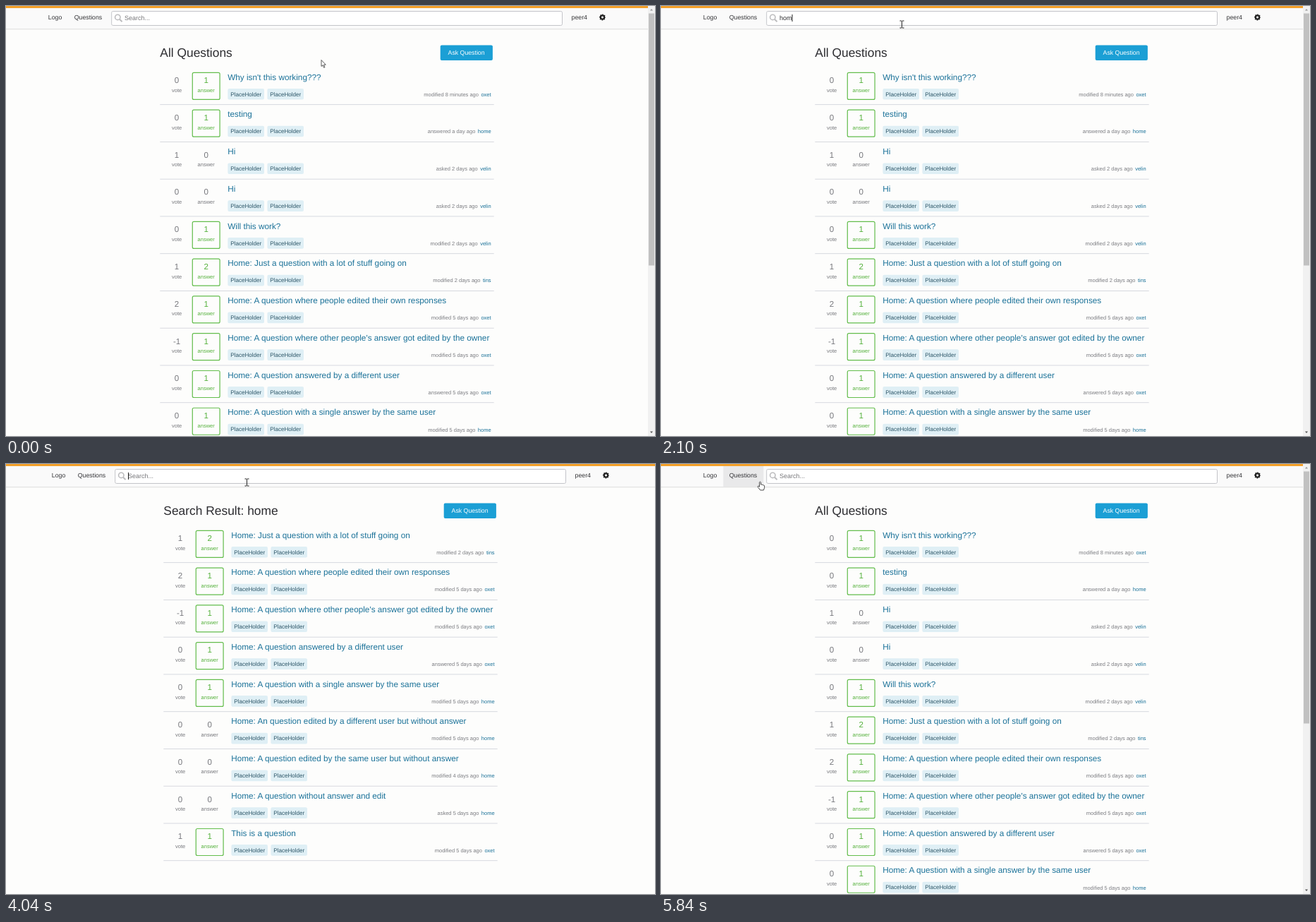
An HTML page for the animation above (5.87 s loop, 920x609 px).

```html
<!DOCTYPE html>
<html lang="en">
<head>
<meta charset="utf-8">
<title>Question list search</title>
<style>
  html, body { margin: 0; width: 100%; height: 100%; overflow: hidden; background: #fdfdfc; }
  svg { display: block; width: 920px; height: 609px; font-family: "Liberation Sans", Arial, sans-serif; text-rendering: geometricPrecision; }
  .nav { font-size: 8.75px; fill: #333336; }
  .heading { font-size: 17.4px; fill: #2d2d31; }
  .title { font-size: 11.77px; fill: #1b7299; }
  .num { font-size: 11.6px; text-anchor: middle; }
  .label { font-size: 7.5px; text-anchor: middle; }
  .grey { fill: #77787d; }
  .green { fill: #55b13c; }
  .tag { font-size: 8.1px; fill: #2d5668; }
  .meta { font-size: 7.5px; fill: #7c7d82; text-anchor: end; }
  .meta tspan { fill: #1b7299; }
  .field { font-size: 9px; fill: #77777a; }
</style>
</head>
<body>
<svg viewBox="0 0 920 609">
  <rect width="920" height="609" fill="#fdfdfc"/>
  <rect y="32" width="920" height="1" fill="#e4e4e4"/>
  <rect y="33" width="920" height="1" fill="#f4f4f3"/>
  <rect y="3" width="920" height="29" fill="#fafafa"/>
  <rect width="920" height="3" fill="#f3a029"/>

  <g id="page">
    <rect id="hover" x="88.3" y="3" width="57" height="29" fill="#e9e9ea"/>
    <text class="nav" x="59.8" y="19.3">Logo</text>
    <text class="nav" x="96.8" y="19.3">Questions</text>
    <rect x="149.7" y="7.5" width="638.8" height="20" rx="2" fill="#fff" stroke="#c3c4c9"/>
    <g fill="none" stroke="#bdbdbf" stroke-width="1.6">
      <circle cx="158.3" cy="15.9" r="3.7"/>
      <path d="M161 18.7L164.6 22.2" stroke-width="2"/>
    </g>
    <text id="field" class="field" x="168" y="20.3"></text>
    <rect id="caret" y="12" width="1" height="10" fill="#222"/>
    <text class="nav" x="801.6" y="19.3">peer4</text>
    <g fill="none" stroke="#222">
      <circle cx="845.5" cy="16" r="2.6" stroke-width="2.2"/>
      <circle cx="845.5" cy="16" r="3.8" stroke-width="1.5" stroke-dasharray="1.492" stroke-dashoffset=".746"/>
    </g>

    <text id="heading" class="heading" x="218.3" y="72.3"></text>
    <rect x="615.7" y="55.5" width="74.2" height="21.6" rx="2" fill="#1b9fd5"/>
    <text x="652.6" y="69.1" font-size="8.75" text-anchor="middle" fill="#fff">Ask Question</text>

    <g id="allList"></g>
    <g id="foundList"></g>
    <g id="loader" fill="none" stroke="#f3a029" stroke-width="5">
      <path d="M-16.6 -16.6A23.5 23.5 0 0 0 -16.6 16.6M16.6 -16.6A23.5 23.5 0 0 1 16.6 16.6"/>
    </g>
  </g>

  <g id="scrollbar">
    <rect x="910" width="10" height="609" fill="#f1f1f1"/>
    <rect x="911" y="10.5" width="8" height="357" fill="#c1c1c1"/>
    <path d="M913 6.5L915 4L917 6.5Z" fill="#9a9a9a"/>
    <path d="M913 602.5L915 605L917 602.5Z" fill="#555"/>
  </g>

  <g id="cursor">
    <path id="arrow" d="M0 0V9L2 7.2L3.6 10.8L5 10.2L3.5 6.7H6.3Z" fill="#fff" stroke="#333" stroke-width=".8"/>
    <path id="beam" d="M-3 -5H-.7L0 -4.4L.7 -5H3M0 -4.4V4.4M-3 5H-.7L0 4.4L.7 5H3" fill="none" stroke="#222"/>
    <path id="hand" d="M-1 .8Q0 -.6 1 .8V4.2Q2.2 3.5 2.9 4.5Q4.2 4 4.7 5.1Q6 4.8 6.1 6.2V8.6L5 12H.2L-3.4 7.4Q-3.4 5.8 -1.9 6.4L-1 7.4Z" fill="#fff" stroke="#333" stroke-width=".9" stroke-linejoin="round"/>
  </g>
</svg>

<script>
const LOOP = 5870;
const ROW_STEP = 52.76;
const WORD = "home";

// Moments in ms
const FOCUS = 1430, KEYS = [1780, 1910, 2050, 2190], SUBMIT = 2540;
const CLICK = 4655, LOAD_TIME = 210;
const LOADS = [2565, 4690];

// votes, answers, title, activity, user
const ROWS = [
  [0, 1, "Why isn't this working???", "modified 8 minutes ago", "oxet"],
  [0, 1, "testing", "answered a day ago", "home"],
  [1, 0, "Hi", "asked 2 days ago", "velin"],
  [0, 0, "Hi", "asked 2 days ago", "velin"],
  [0, 1, "Will this work?", "modified 2 days ago", "velin"],
  [1, 2, "Home: Just a question with a lot of stuff going on", "modified 2 days ago", "tins"],
  [2, 1, "Home: A question where people edited their own responses", "modified 5 days ago", "oxet"],
  [-1, 1, "Home: A question where other people's answer got edited by the owner", "modified 5 days ago", "oxet"],
  [0, 1, "Home: A question answered by a different user", "answered 5 days ago", "oxet"],
  [0, 1, "Home: A question with a single answer by the same user", "modified 5 days ago", "home"],
  [0, 0, "Home: An question edited by a different user but without answer", "modified 5 days ago", "home"],
  [0, 0, "Home: A question edited by the same user but without answer", "modified 4 days ago", "home"],
  [0, 0, "Home: A question without answer and edit", "asked 5 days ago", "home"],
  [1, 1, "This is a question", "modified 5 days ago", "oxet"]
];

// time, x, y
const PATH = [
  [0, 447, 76.5], [250, 447, 76.5], [1050, 341.5, 26],
  [4210, 341.5, 26], [4540, 140.5, 25], [LOOP, 140.5, 25]
];

const $ = id => document.getElementById(id);
const show = (id, on) => $(id).setAttribute("visibility", on ? "visible" : "hidden");
const move = (id, x, y, turn = 0) =>
  $(id).setAttribute("transform", `translate(${x} ${y}) rotate(${turn})`);
const setText = (id, text) => {
  if ($(id).textContent !== text) $(id).textContent = text;
};

function tag(x) {
  return `<rect x="${x}" y="117" width="51.6" height="15.6" rx="2" fill="#dfeff5"/>
    <text class="tag" x="${x + 3.8}" y="127.6">PlaceHolder</text>`;
}

function count(x, value, label, tone) {
  return `<text class="num ${tone}" x="${x}" y="109.2">${value}</text>
    <text class="label ${tone}" x="${x}" y="121.9">${label}</text>`;
}

function row([votes, answers, title, activity, user], i) {
  const box = answers
    ? `<rect x="264.3" y="94.4" width="38.8" height="38" rx="2" fill="none" stroke="#63bd4c" stroke-width="1.2"/>`
    : "";
  return `<g transform="translate(0 ${i * ROW_STEP})">
    ${count(242.1, votes, "vote", "grey")}${box}
    ${count(283.7, answers, "answer", answers ? "green" : "grey")}
    <text class="title" x="314.2" y="104.6">${title}</text>
    ${tag(314.4)}${tag(370.4)}
    <text class="meta" x="687.6" y="127.7">${activity}<tspan dx="3.5">${user}</tspan></text>
    <rect x="218.3" y="139.2" width="473.4" height=".9" fill="#d3d5dc"/>
  </g>`;
}

function cursorAt(t) {
  const i = PATH.findIndex(p => p[0] > t);
  const [t0, x0, y0] = PATH[i - 1], [t1, x1, y1] = PATH[i];
  const k = (t - t0) / (t1 - t0), e = k * k * (3 - 2 * k);
  return [x0 + (x1 - x0) * e, y0 + (y1 - y0) * e];
}

function drawField(t) {
  const typed = t < SUBMIT ? WORD.slice(0, KEYS.filter(k => k <= t).length) : "";
  setText("field", typed || "Search...");
  $("field").style.fill = typed ? "#2b2b2e" : "";
  const last = Math.max(FOCUS, ...[...KEYS, SUBMIT].filter(k => k <= t));
  const blinkOn = Math.floor((t - last) / 530) % 2 === 0;
  $("caret").setAttribute("x", 168 + (typed ? $("field").getComputedTextLength() : 0));
  show("caret", t >= FOCUS && t < CLICK && blinkOn);
}

function draw(t) {
  const start = LOADS.find(s => t >= s && t < s + LOAD_TIME);
  const loading = start !== undefined;
  const long = t < LOADS[0] || t >= LOADS[1] + LOAD_TIME;
  const shift = long ? 0 : 5;

  move("page", shift, 0);
  show("scrollbar", long);
  show("allList", long);
  show("foundList", !long && !loading);
  show("loader", loading);
  if (loading) move("loader", 455, 122, (t - start) * 0.3);
  setText("heading", t >= SUBMIT && t < CLICK ? "Search Result: " + WORD : "All Questions");
  drawField(t);

  const [x, y] = cursorAt(t);
  const overLink = y < 32 && x > 88 + shift && x < 145.5 + shift;
  const overField = y > 7 && y < 28 && x > 149 + shift && x < 789 + shift;
  move("cursor", x, y);
  show("hover", overLink);
  show("hand", overLink);
  show("beam", overField);
  show("arrow", !overLink && !overField);
}

$("allList").innerHTML = ROWS.slice(0, 10).map(row).join("");
$("foundList").innerHTML = ROWS.slice(5).map(row).join("");

const began = performance.now();
function tick() {
  draw((performance.now() - began) % LOOP);
  requestAnimationFrame(tick);
}
tick();
</script>
</body>
</html>
```
